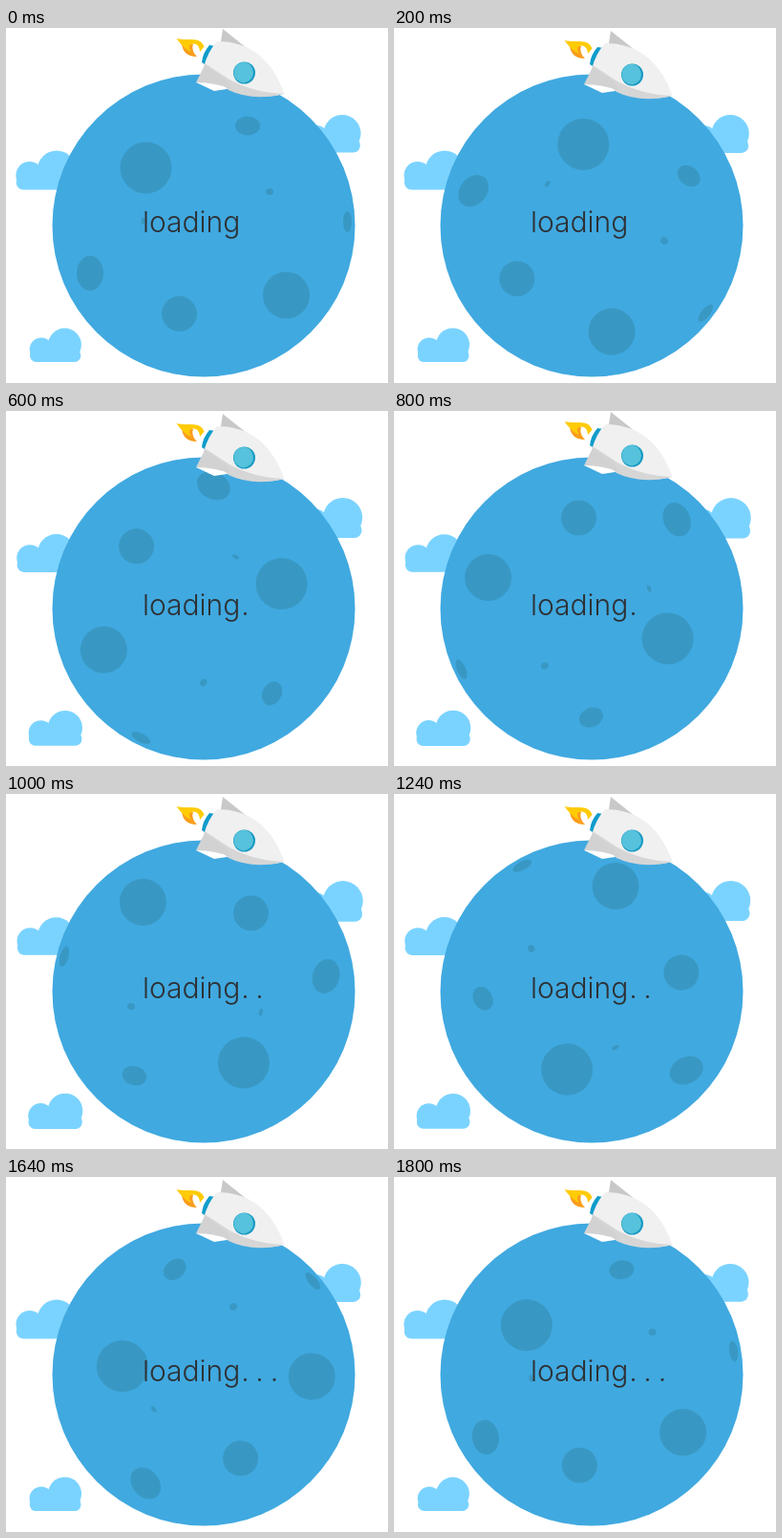
Recreate the animation shown at these times as an HTML page. Size 400x372 px, loop 1.84 s.

```html
<!DOCTYPE html>
<html lang="en">
<head>
<meta charset="utf-8">
<title>Loading</title>
<style>
  html, body { margin: 0; width: 100%; height: 100%; overflow: hidden; background: #fff; }
  svg { display: block; width: 400px; height: 372px; }
  text { font: 300 30px Inter, "Open Sans", sans-serif; fill: #2d3033; }
</style>
</head>
<body>
<svg viewBox="0 0 400 372">
  <defs>
    <g id="cloud" fill="#7ad3ff">
      <circle cx="-15" cy="4.5" r="12.3"/>
      <circle cx="9.5" cy="-.3" r="17.4"/>
      <rect x="-27" y="4" width="53.3" height="13.7" rx="6.5"/>
    </g>
  </defs>

  <g id="clouds"></g>
  <circle cx="207" cy="207" r="158.5" fill="#40a9e0"/>
  <g id="craters" fill="#3998c3"></g>

  <g id="rocket">
    <path d="M184 17C185 24 189 30 200 30C197 27 194 22 196 17Z" fill="#f99d1c"/>
    <path d="M178.500 11C190 14 203 8 207.500 19.500L203 25C203 18 198 15 194 17C190 19 193 23 194 25C188 23 183 17 178.500 11Z" fill="#ffcb05"/>
    <path d="M227 1L252 21L224 20Z" fill="#c8c8c8"/>
    <path d="M199 57L218 66L238 63L222 54Z" fill="#fff"/>
    <path d="M213 18L220 19L211 40L205 36Q206 26 213 18Z" fill="#109ccb"/>
    <path d="M221 14Q272 14 291.500 69Q246 81 207 41Q211 25 221 14Z" fill="#f0f0f0"/>
    <path d="M208 37L234 54Q260 68 291.500 69Q258 77 233 65L207 42Z" fill="#d6d6d6"/>
    <path d="M208 39L199 57Q218 57 236 64L230 54Z" fill="#d2d2d2"/>
    <circle cx="249.500" cy="47" r="11.500" fill="#1799c2"/>
    <ellipse cx="248.700" cy="46.500" rx="10.300" ry="10.700" fill="#56c2db"/>
  </g>

  <text x="143" y="214">loading</text>
  <g id="dots" text-anchor="middle">
    <text x="250.500" y="214">.</text>
    <text x="265.500" y="214">.</text>
    <text x="281" y="214">.</text>
  </g>
</svg>
<script>
const LOOP = 1840, STEP = 40;
const $ = id => document.getElementById(id);

function add(parent, tag, attrs) {
  const el = document.createElementNS("http://www.w3.org/2000/svg", tag);
  for (const key in attrs) el.setAttribute(key, attrs[key]);
  return parent.appendChild(el);
}

// cx, cy, rx, ry
[
  [146.5, 146.5, 27, 27],
  [253, 102.5, 13, 10],
  [276, 171.5, 4, 3.5],
  [357.5, 203, 4.5, 11],
  [293.5, 280, 24.5, 24.5],
  [181.5, 299.5, 18.5, 18.5],
  [88, 257, 14, 18.2],
  [143.5, 202.3, 2, 3.8]
].forEach(([cx, cy, rx, ry]) => add($("craters"), "ellipse", { cx, cy, rx, ry }));

const clouds = [
  { x: 42, y: 149, scale: 1.16, grow: -.045, drop: 0 },
  { x: 341.4, y: 110.8, scale: 1.12, grow: .085, drop: 1.6 },
  { x: 52, y: 332.3, scale: 1, grow: .055, drop: 0 }
];
for (const cloud of clouds) cloud.el = add($("clouds"), "use", { href: "#cloud" });

function render(time) {
  const step = Math.floor((time % LOOP) / STEP);
  const t = step * STEP;
  const swell = (1 - Math.cos(2 * Math.PI * t / LOOP)) / 2;

  $("craters").setAttribute("transform", `rotate(${360 * t / LOOP} 207 207)`);
  $("rocket").setAttribute("transform", `translate(0 ${step % 2 * 2})`);

  for (const { el, x, y, scale, grow, drop } of clouds) {
    el.setAttribute("transform", `translate(${x} ${y + drop * swell}) scale(${scale + grow * swell})`);
  }

  const shown = Math.floor((t + STEP / 2) / (LOOP / 4));
  [...$("dots").children].forEach((dot, i) => {
    dot.style.display = i < shown ? "" : "none";
  });
}

let start;
function tick(now) {
  start ??= now;
  render(now - start);
  requestAnimationFrame(tick);
}
render(0);
requestAnimationFrame(tick);
</script>
</body>
</html>
```
